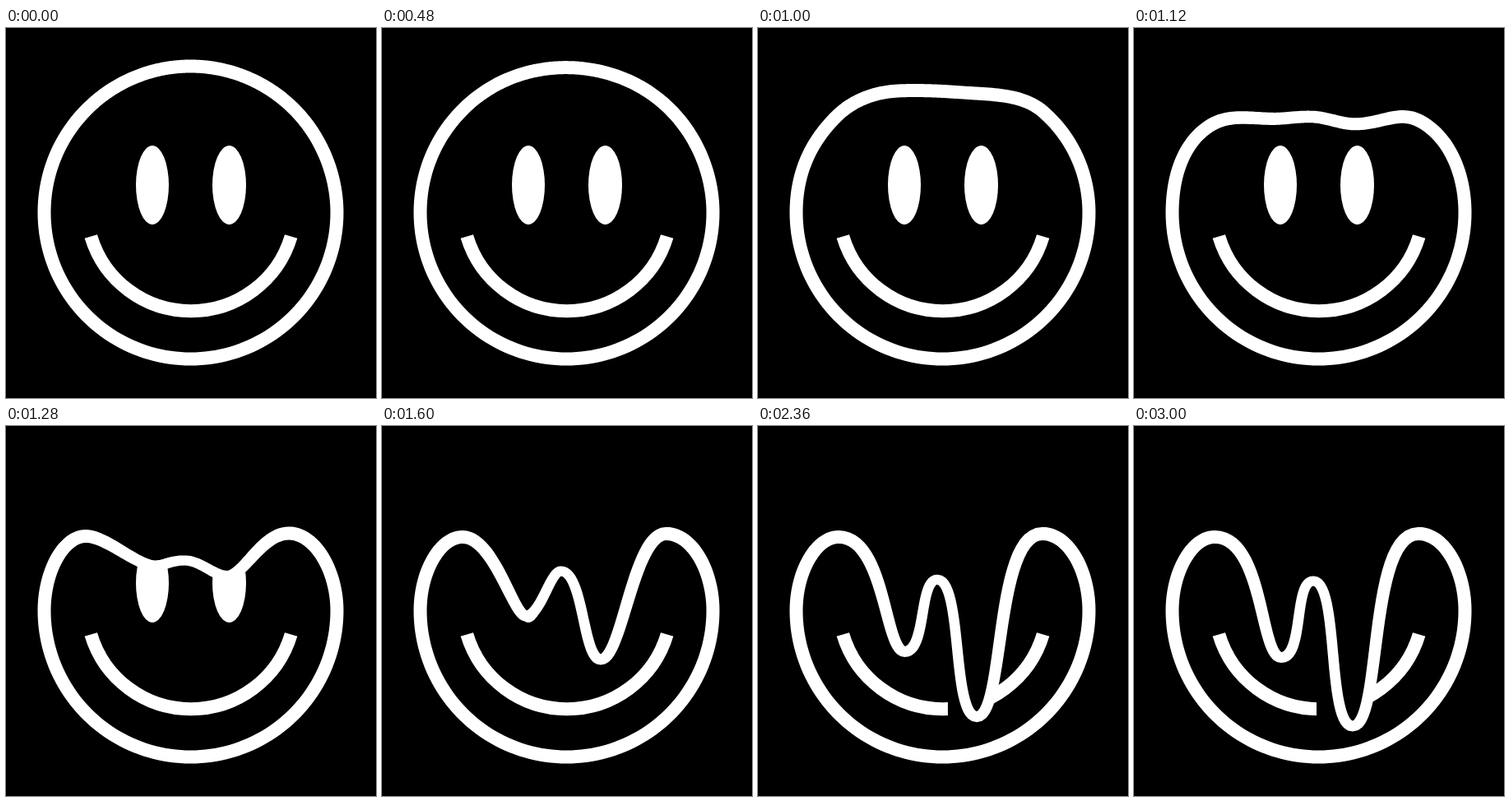
These frames come from a looping animation (450 px wide and 450 px high, 5 s). An HTML page:

```html
<!DOCTYPE html>
<html lang="en">
<head>
<meta charset="utf-8">
<title>Melting smile</title>
<style>
  html, body { margin: 0; width: 100%; height: 100%; overflow: hidden; background: #000; }
  svg { display: block; width: 100%; height: 100%; }
</style>
</head>
<body>
<svg viewBox="0 0 450 450">
  <defs><clipPath id="inside"><path id="mid"/></clipPath></defs>
  <rect width="450" height="450"/>
  <g clip-path="url(#inside)">
    <g fill="#fff">
      <ellipse cx="178" cy="191" rx="20" ry="48"/>
      <ellipse cx="271.5" cy="191" rx="20.5" ry="48"/>
    </g>
    <path d="M103.3 253.5A127 127 0 0 0 346.7 253.5" fill="none" stroke="#fff" stroke-width="16"/>
    <rect id="wipe" y="328" height="30"/>
  </g>
  <path id="rim" fill="#fff" fill-rule="evenodd"/>
</svg>
<script>
const LOOP = 5000, END = 3000, STEP = 40;
const CX = 224.5, CY = 224.5, R = 178;
const RAD = Math.PI / 180;
const WIDTHS = [16, 16, 13.2, 12.2, 13.2, 16.2, 16];
const $ = id => document.getElementById(id);

// Five anchors across the top of the head: x, y, tangent angle, handle in, handle out
const arcs = [180, 135, 105, 92, 76.5, 47, 0];
const handle = sweep => R * 4 / 3 * Math.tan(sweep * RAD / 4);
const round = arcs.slice(1, -1).map((a, i) => [
  CX + R * Math.cos(a * RAD), CY - R * Math.sin(a * RAD), 90 - a,
  handle(arcs[i] - a), handle(a - arcs[i + 2])
]);
const flat = [
  [97, 106, -44, 46, 26], [170, 76.5, -3, 28, 15], [215, 76.5, 2, 15, 16],
  [265, 79.5, 3, 16, 38], [347, 102, 41, 25, 46]
];
const bumps = [
  [97, 134, 0, 27, 25], [181, 170, 0, 22, 12], [217, 163.5, 0, 18, 20],
  [269, 182.5, 0, 16, 20], [344, 130.5, 0, 33, 32]
];
const drips = [
  [98, 135, 0, 27, 38], [175, 231, 0, 15, 18], [217.5, 176.5, 0, 13, 28],
  [266, 284, 0, 22, 26], [345.5, 131, 0, 40, 32]
];
const melted = [
  [98, 135, 0, 27, 60], [179, 281.5, 0, 26, 28], [218, 188.5, 0, 24, 32],
  [266, 365, 0, 32, 36], [346, 131, 0, 62, 32]
];

const stages = [
  { t: 0, from: round, to: flat, ease: u => u ** 4 },
  { t: 1000, from: flat, to: bumps, ease: u => u ** 1.2 },
  { t: 1280, from: bumps, to: drips, ease: u => u * (1.3 - 0.3 * u) },
  { t: 1600, from: drips, to: melted, ease: u => 1 - (1 - u) ** 2.5 }
];

const mix = (a, b, p) => a + (b - a) * p;

function poseAt(t) {
  let i = stages.length - 1;
  while (stages[i].t > t) i--;
  const s = stages[i], next = i + 1 < stages.length ? stages[i + 1].t : END;
  const p = s.ease((t - s.t) / (next - s.t));
  return {
    anchors: s.from.map((a, k) => a.map((v, j) => mix(v, s.to[k][j], p))),
    taper: i === 0 ? 0 : i === 1 ? p : 1
  };
}

function bezier(a, b, u) {
  const v = 1 - u;
  const ca = Math.cos(a[2] * RAD), sa = Math.sin(a[2] * RAD);
  const cb = Math.cos(b[2] * RAD), sb = Math.sin(b[2] * RAD);
  const at = (p, q, r, s) => v * v * v * p + 3 * v * v * u * q + 3 * v * u * u * r + u * u * u * s;
  return [
    at(a[0], a[0] + ca * a[4], b[0] - cb * b[3], b[0]),
    at(a[1], a[1] + sa * a[4], b[1] - sb * b[3], b[1])
  ];
}

// Closed centre line as points [x, y, width]
function outline({ anchors, taper }) {
  const knots = [[CX - R, CY, -90, 0, 48], ...anchors, [CX + R, CY, 90, 48, 0]];
  const pts = [], N = 28, M = 90;
  for (let k = 0; k < knots.length - 1; k++) {
    for (let i = 0; i < N; i++) {
      const u = i / N;
      const w = mix(16, mix(WIDTHS[k], WIDTHS[k + 1], u), taper);
      pts.push([...bezier(knots[k], knots[k + 1], u), w]);
    }
  }
  for (let i = 0; i < M; i++) {
    const a = Math.PI * i / M;
    pts.push([CX + R * Math.cos(a), CY + R * Math.sin(a), 16]);
  }
  return pts;
}

const toPath = pts => "M" + pts.map(p => p[0].toFixed(2) + " " + p[1].toFixed(2)).join("L") + "Z";

function offset(pts, side) {
  const n = pts.length;
  return pts.map(([x, y, w], i) => {
    const a = pts[(i + n - 1) % n], b = pts[(i + 1) % n];
    const dx = b[0] - a[0], dy = b[1] - a[1];
    const k = side * w / 2 / Math.hypot(dx, dy);
    return [x + dy * k, y - dx * k];
  });
}

function draw(time) {
  const t = Math.min(END, Math.floor(time % LOOP / STEP) * STEP);
  const pose = poseAt(t);
  const pts = outline(pose);
  $("mid").setAttribute("d", toPath(pts));
  $("rim").setAttribute("d", toPath(offset(pts, 1)) + toPath(offset(pts, -1)));
  // The long drip wipes away the mouth on its left
  const cut = 222 + (365 - pose.anchors[3][1]) * 0.78;
  $("wipe").setAttribute("x", cut);
  $("wipe").setAttribute("width", Math.max(0, 256 - cut));
}

const start = performance.now();
function tick() {
  draw(performance.now() - start);
  requestAnimationFrame(tick);
}
tick();
</script>
</body>
</html>
```
